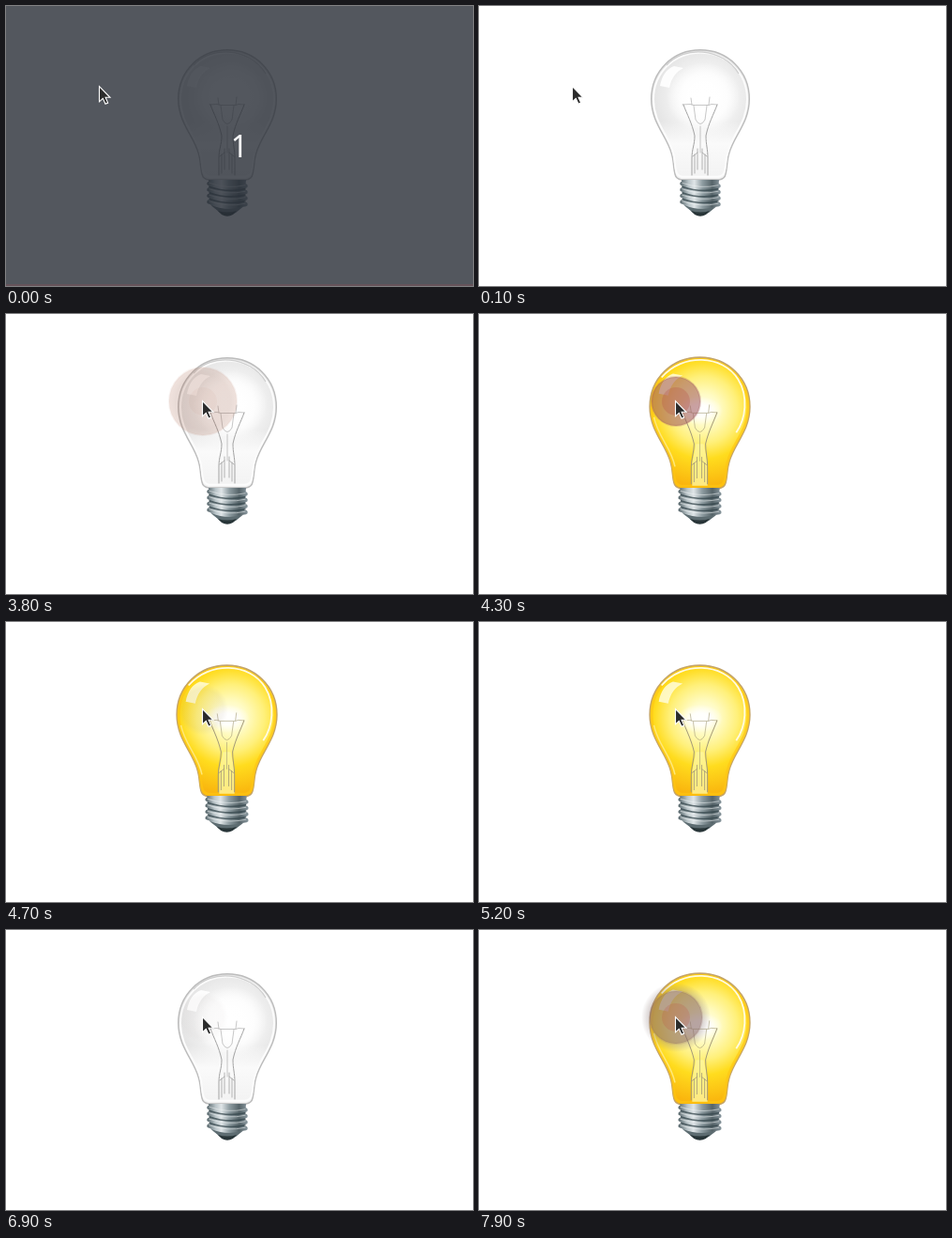
Recreate the animation shown at these times as an HTML page. Size 498 by 298 pixels, loop 8000 ms.

```html
<!DOCTYPE html>
<html lang="en">
<head>
<meta charset="utf-8">
<title>Light bulb toggle</title>
<style>
html, body { margin: 0; width: 100%; height: 100%; overflow: hidden; background: #fff; }
svg { display: block; width: 498px; height: 298px; }
text { font: 32px "Noto Sans", "Open Sans", sans-serif; fill: #fff; }
</style>
</head>
<body>
<svg viewBox="0 0 498 298">
  <defs>
    <path id="glass" d="M236 46.8C265 46.8 288.3 69 288.3 99C288.3 124 272 138 267 156C264 165 265 172 263 179Q262 184 256 185H216Q210 184 209 179C207 172 208 165 205 156C200 138 183.7 124 183.7 99C183.7 69 207 46.8 236 46.8Z"/>
    <radialGradient id="clear" gradientUnits="userSpaceOnUse" cx="240" cy="98" r="62">
      <stop offset="0" stop-color="#fff"/><stop offset=".4" stop-color="#fbfbfb"/>
      <stop offset=".62" stop-color="#eee"/><stop offset=".9" stop-color="#e3e3e3"/>
      <stop offset="1" stop-color="#ececec"/>
    </radialGradient>
    <linearGradient id="neck" x2="0" y2="1">
      <stop offset=".55" stop-color="#fff" stop-opacity="0"/>
      <stop offset=".72" stop-color="#fafafa"/><stop offset="1" stop-color="#f2f2f2"/>
    </linearGradient>
    <radialGradient id="glow" gradientUnits="userSpaceOnUse" cx="240" cy="102" r="84">
      <stop offset="0" stop-color="#fffff0"/><stop offset=".2" stop-color="#fffbc4"/>
      <stop offset=".42" stop-color="#fff07a"/><stop offset=".62" stop-color="#ffdc1e"/>
      <stop offset="1" stop-color="#f9b10c"/>
    </radialGradient>
    <radialGradient id="spark">
      <stop offset="0" stop-color="#fff"/><stop offset=".4" stop-color="#fff" stop-opacity=".9"/>
      <stop offset="1" stop-color="#fff" stop-opacity="0"/>
    </radialGradient>
    <linearGradient id="metal" gradientUnits="userSpaceOnUse" x1="215" x2="257">
      <stop offset="0" stop-color="#5c6b70"/><stop offset=".2" stop-color="#b9c4c8"/>
      <stop offset=".35" stop-color="#dfe5e7"/><stop offset=".55" stop-color="#8f9da2"/>
      <stop offset=".8" stop-color="#566469"/><stop offset="1" stop-color="#85939a"/>
    </linearGradient>
    <radialGradient id="soft">
      <stop offset=".8" stop-color="#8a7674"/><stop offset="1" stop-color="#8a7674" stop-opacity="0"/>
    </radialGradient>
    <path id="window" d="M193 85C195 74 200 67 208 64L218 66C210 70 205 77 203 87Z"/>
    <g id="filament" fill="none" stroke-linecap="round">
      <path d="M217 105L225 104.500L229 105.500H245L248 104.500L254 105" stroke-width=".6"/>
      <path d="M218 105C222 116 227 124 230 138C230 148 227 152 227 162V180M254 105C250 116 245 124 242 138C242 148 244 152 244 162V180" stroke-width="1"/>
      <path d="M226 98L227 105M246 97L245 105M229 106L231 121Q236 130 241 121L243 106M236 128V156" stroke-width=".6"/>
      <path d="M230 158V178M233 152V174M238 152V174M241 158V178M228 160L233 156M238 156L243 160" stroke-width=".8"/>
    </g>
    <path id="thread" d="M216.500 189Q236 196 255.500 191.500" fill="none"/>
    <g id="base">
      <path d="M216 185H256L254 210Q251 215 246 218H227Q219 214 217.500 210Z" fill="url(#metal)"/>
      <g stroke="url(#metal)" stroke-width="4.500" stroke-linecap="round">
        <use href="#thread"/><use href="#thread" y="6.500"/><use href="#thread" y="13"/><use href="#thread" y="19.500"/>
      </g>
      <g stroke="#35464c" stroke-width="1.700" opacity=".75">
        <use href="#thread" y="3.200"/><use href="#thread" y="9.700"/><use href="#thread" y="16.200"/>
      </g>
      <g stroke="#eef2f3" stroke-width="1" opacity=".55">
        <use href="#thread" y="-.8"/><use href="#thread" y="5.700"/><use href="#thread" y="12.200"/><use href="#thread" y="18.700"/>
      </g>
      <path d="M219 212Q236 219 253 213.500L245 220Q236 225 228 220Z" fill="#5d6c71"/>
      <path d="M226 218Q236 221 246 218L242 222Q236 225.500 230 222Z" fill="#283538"/>
    </g>
  </defs>

  <rect width="498" height="298" fill="#fff"/>

  <g id="off">
    <use href="#glass" fill="url(#clear)"/>
    <use href="#glass" fill="url(#neck)" stroke="#bcbcbc" stroke-width="1.400"/>
    <use href="#glass" fill="none" stroke="#fcfcfc" stroke-width="2" transform="translate(236 112) scale(.955) translate(-236 -112)"/>
    <path d="M200 63C218 42 260 44 277 72" fill="none" stroke="#cfcfcf" stroke-width="1.200"/>
    <ellipse cx="239" cy="96" rx="40" ry="36" fill="url(#spark)"/>
    <use href="#window" fill="#fff" opacity=".9"/>
    <use href="#filament" stroke="#a2a2a2"/>
    <use href="#base"/>
  </g>

  <g id="on">
    <g transform="translate(235.500 116) scale(1.020 1.010) translate(-236 -116)">
      <use href="#glass" fill="url(#glow)" stroke="#c4a468" stroke-width="1.600"/>
      <use href="#glass" fill="none" stroke="#ffc711" stroke-width="3" opacity=".65" transform="translate(236 112) scale(.965) translate(-236 -112)"/>
      <path d="M196 68C218 42 260 44 276 70C287 88 284 112 274 126" fill="none" stroke="#fffbe0" stroke-width="1.800"/>
      <path d="M188 110C192 130 206 142 210 162" fill="none" stroke="#ffe978" stroke-width="1.500"/>
      <path d="M228 182V157L232 138H240L244 157V182Z" fill="#fff6a0" opacity=".8"/>
      <ellipse cx="236" cy="103" rx="24" ry="15" fill="url(#spark)"/>
      <use href="#window" fill="#fffbd8" opacity=".85"/>
      <use href="#filament" stroke="#a39a78"/>
    </g>
    <use href="#base" transform="translate(235.500 0) scale(1.060 1) translate(-236 0)"/>
  </g>

  <g id="ripple" transform="translate(210 93)">
    <circle id="halo" fill="url(#soft)"/>
    <g id="disc">
      <circle id="outer" fill-opacity=".57" stroke-opacity=".25" stroke-width="2"/>
      <circle id="inner" r="15" opacity=".32"/>
    </g>
  </g>

  <g id="countdown">
    <rect width="498" height="298" fill="#282d36" opacity=".8"/>
    <rect y="296" width="498" height="2" fill="#66545b"/>
    <text x="249" y="161" text-anchor="middle">1</text>
  </g>

  <path id="cursor" d="M.5 .5V16.800L4.300 13.300L7 19.300L9.700 18.100L7.100 12.300H12Z" fill="#2b2b2b" stroke="#fff" stroke-width="1.100"/>
</svg>

<script>
const LOOP = 8000, STEP = 100, TOGGLE_DELAY = 300;
const clicks = [3800, 5600, 7500];
const el = id => document.getElementById(id);
const clamp = x => Math.max(0, Math.min(1, x));
const show = (id, visible) => el(id).setAttribute("display", visible ? "inline" : "none");
const set = (id, name, value) => el(id).setAttribute(name, value);

function cursorAt(t) {
  const travel = clamp((t - 800) / 700);
  const eased = (1 - Math.cos(Math.PI * travel)) / 2;
  const nudge = clamp((t - 1700) / 200);
  return [99 + 106 * eased + 4 * nudge, 85 + 7 * eased];
}

function drawRipple(age, lit) {
  const pressing = age < 500;
  const fade = pressing ? clamp((age + 200) / 700) : clamp((900 - age) / 400);
  const halo = pressing ? 0.28 * clamp((age + 100) / 400)
    : age > 500 ? 0.1 * clamp((1700 - age) / 1100) : 0;
  const color = !lit ? "#a85a3c" : pressing ? "#8f6e6a" : "#a05a5f";
  set("halo", "r", pressing ? 37 : 27);
  set("halo", "opacity", halo);
  set("disc", "opacity", fade);
  set("outer", "r", 26 + Math.abs(500 - age) * 0.02);
  set("outer", "fill", color);
  set("outer", "stroke", color);
  set("inner", "fill", lit ? "#b8584a" : color);
}

function render(time) {
  const t = Math.floor((time % LOOP) / STEP) * STEP;
  const lit = clicks.filter(c => t >= c + TOGGLE_DELAY).length % 2 === 1;
  const pressed = clicks.filter(c => t >= c).pop();
  show("countdown", t < 100);
  show("on", lit);
  show("off", !lit);
  // On the lit glass the afterglow is gone once the disc has faded.
  const visible = pressed !== undefined && !(lit && t - pressed >= 1400);
  show("ripple", visible);
  if (visible) drawRipple(t - pressed, lit);
  set("cursor", "transform", `translate(${cursorAt(t)})`);
}

const start = performance.now();
function tick() {
  render(performance.now() - start);
  requestAnimationFrame(tick);
}
tick();
</script>
</body>
</html>
```
